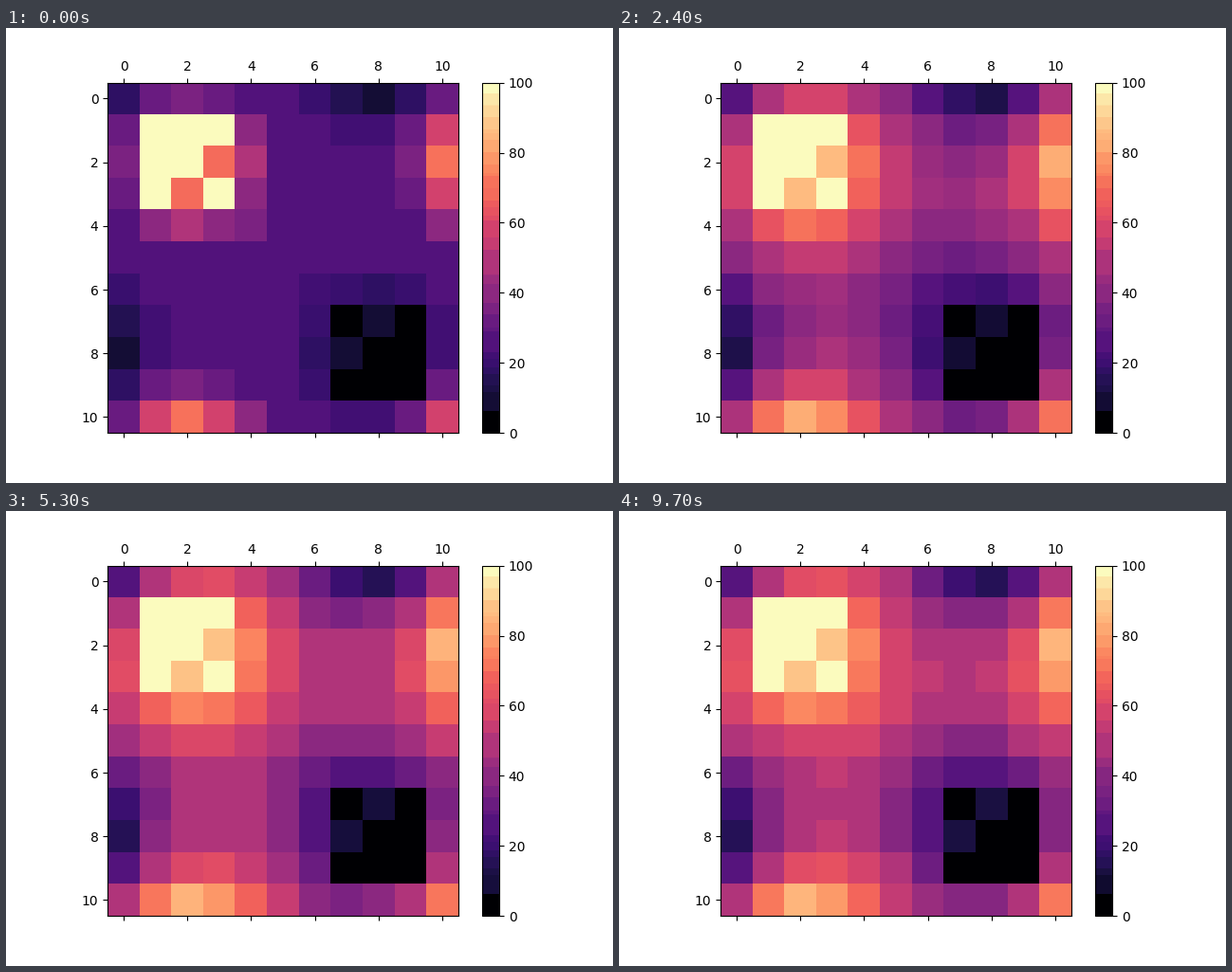
Recreate the animation shown at these times as a matplotlib script. Size 640 by 480 pixels, loop 10 s.

```python
import numpy as np
import matplotlib.pyplot as plt
from matplotlib.animation import FuncAnimation
from matplotlib.colors import ListedColormap

FRAMES, INTERVAL = 100, 100
WARMUP = 2                      # averaging steps before the first picture
SIZE, AMBIENT, HOT, COLD = 11, 25.0, 100.0, 0.0
HOT_CELLS = [(1, 1), (1, 2), (1, 3), (2, 1), (2, 2), (3, 1), (3, 3)]
COLD_CELLS = [(7, 7), (7, 9), (8, 8), (8, 9), (9, 7), (9, 8), (9, 9)]
CELL_AREA = (369.6 / SIZE) ** 2
BAR_STEP_AREA = 18.48 * 369.6 / 256


def hold_sources(grid):
    for cells, value in ((HOT_CELLS, HOT), (COLD_CELLS, COLD)):
        rows, cols = zip(*cells)
        grid[rows, cols] = value
    return grid


def step(grid):
    """3x3 mean of the inner cells; the rim wraps around before sources reset."""
    inner = SIZE - 2
    mean = sum(grid[r:r + inner, c:c + inner]
               for r in range(3) for c in range(3)) / 9
    return hold_sources(np.pad(mean, 1, mode="wrap"))


def simulate():
    grid = hold_sources(np.full((SIZE, SIZE), AMBIENT))
    states = []
    for n in range(FRAMES + WARMUP):
        grid = step(grid)
        if n >= WARMUP - 1:
            states.append(grid)
    return states[:FRAMES]


MAGMA = plt.get_cmap("magma")(np.arange(256), bytes=True)[:, :3].astype(int)
# Colour boxes: 3 bits of red, 4 of green, 3 of blue
BOXES = (MAGMA[:, 0] >> 5) * 128 + (MAGMA[:, 1] >> 4) * 8 + (MAGMA[:, 2] >> 5)


def banded_cmap(grid):
    """Magma reduced to one area-weighted mean colour per colour box."""
    index = np.clip(grid * 2.56, 0, 255).astype(int).ravel()
    area = np.bincount(index, minlength=256) * CELL_AREA + BAR_STEP_AREA
    total = np.bincount(BOXES, area)
    means = [np.bincount(BOXES, area * channel)[BOXES] / total[BOXES]
             for channel in MAGMA.T]
    return ListedColormap(np.floor(np.stack(means, axis=1) + 1e-6) / 255)


states = simulate()
fig, ax = plt.subplots(figsize=(6.4, 4.8), dpi=100)
heat = ax.matshow(states[0], cmap=banded_cmap(states[0]), vmin=0, vmax=100)
fig.colorbar(heat, ax=ax)


def update(n):
    heat.set_data(states[n])
    heat.set_cmap(banded_cmap(states[n]))
    return [heat]


anim = FuncAnimation(fig, update, frames=FRAMES, interval=INTERVAL,
                     repeat=True, repeat_delay=0, blit=False)
plt.show()
```
